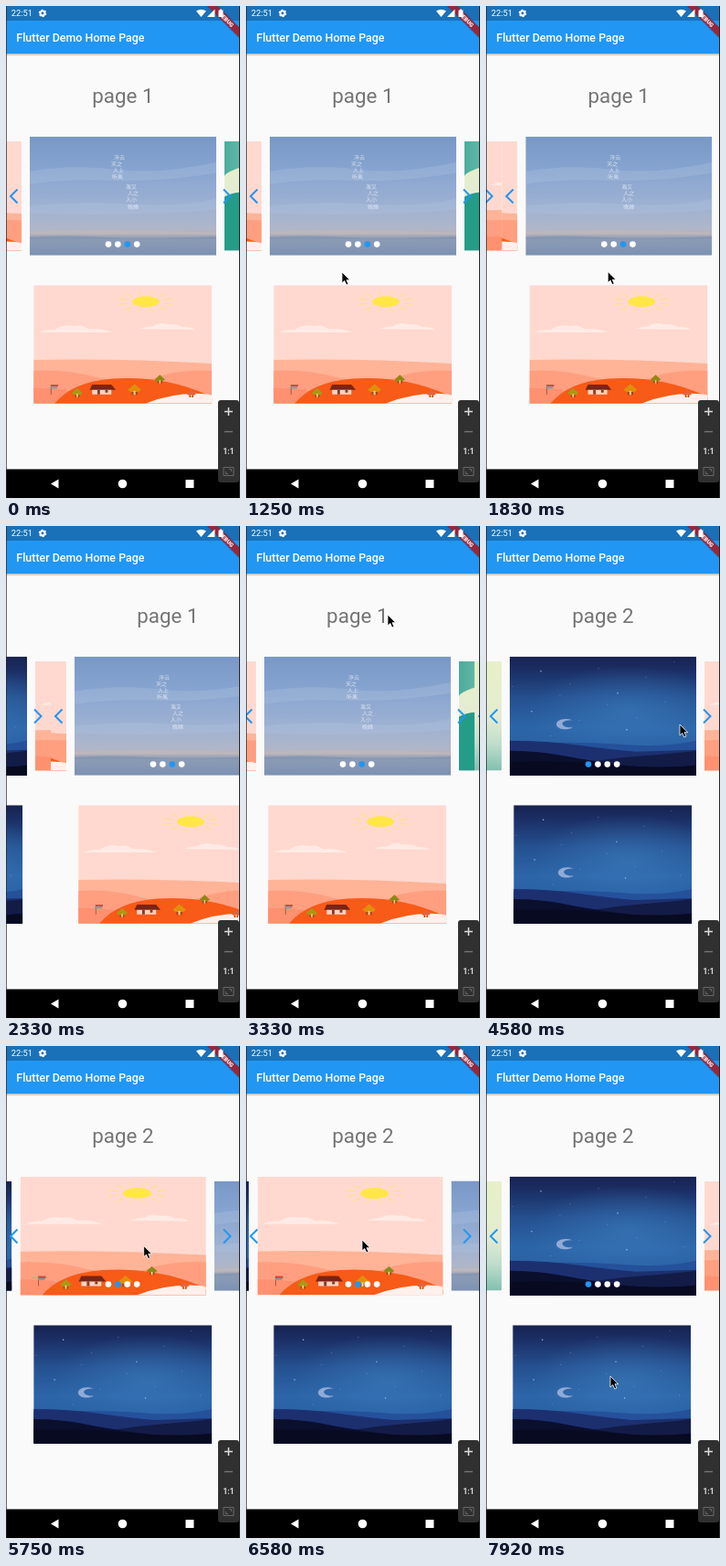
Recreate the animation shown at these times as an HTML page. Size 256 by 538 pixels, loop 8 s.

```html
<!DOCTYPE html>
<html lang="en">
<head>
<meta charset="utf-8">
<title>Nested page views</title>
<style>
html, body { margin: 0; width: 100%; height: 100%; overflow: hidden; background: #fafafa; }
svg { display: block; }
#stage { width: 100vw; height: 100vh; }
text { font-family: Roboto, sans-serif; }
.poem { font: 6px "Noto Sans CJK SC", "Noto Sans CJK", sans-serif; fill: #eef2fa; opacity: .8; }
</style>
</head>
<body>
<svg id="stage" viewBox="0 0 256 538" xmlns="http://www.w3.org/2000/svg">
<defs>
  <linearGradient id="nightSky" x2="0" y2="1">
    <stop offset="0" stop-color="#17224f"/><stop offset=".12" stop-color="#1b2f66"/>
    <stop offset=".35" stop-color="#25508f"/><stop offset=".6" stop-color="#2c66a9"/>
    <stop offset="1" stop-color="#27599c"/>
  </linearGradient>
  <radialGradient id="nightGlow">
    <stop offset="0" stop-color="#3a7abb" stop-opacity=".65"/>
    <stop offset="1" stop-color="#3a7abb" stop-opacity="0"/>
  </radialGradient>
  <linearGradient id="duskSky" x2="0" y2="1">
    <stop offset="0" stop-color="#7898c6"/><stop offset=".3" stop-color="#88a5d0"/>
    <stop offset=".6" stop-color="#9fb2d2"/><stop offset=".78" stop-color="#b0b6c8"/>
    <stop offset=".82" stop-color="#b3b1bb"/><stop offset=".86" stop-color="#8c9cb6"/>
    <stop offset="1" stop-color="#7c91b1"/>
  </linearGradient>
  <linearGradient id="greenSky" x2="0" y2="1">
    <stop offset="0" stop-color="#e6f1c8"/><stop offset=".5" stop-color="#e4ecd2"/>
    <stop offset=".75" stop-color="#c0dfcc"/><stop offset="1" stop-color="#82bfb0"/>
  </linearGradient>
  <linearGradient id="teal">
    <stop offset="0" stop-color="#4aac9d"/><stop offset="1" stop-color="#4aac9d" stop-opacity="0"/>
  </linearGradient>
  <linearGradient id="sea">
    <stop offset="0" stop-color="#239c88"/><stop offset=".4" stop-color="#239c88"/>
    <stop offset="1" stop-color="#239c88" stop-opacity="0"/>
  </linearGradient>
  <linearGradient id="barShadow" x2="0" y2="1">
    <stop offset="0" stop-opacity=".28"/><stop offset="1" stop-opacity="0"/>
  </linearGradient>

  <symbol id="night" viewBox="0 0 204 130" preserveAspectRatio="none">
    <path fill="url(#nightSky)" d="M0 0h204v130H0z"/>
    <ellipse cx="130" cy="62" rx="110" ry="52" fill="url(#nightGlow)"/>
    <g id="stars" fill="#a9c8ee"/>
    <path fill="#8fabd6" d="M69 69.500C58 66 50 70 51 75C53 80 63 81 69 77.500C62 78 57.500 76 57.500 73.500C57.500 71 62 69.500 69 69.500z"/>
    <path fill="#24519a" d="M0 96Q70 92 120 96T204 92V130H0z"/>
    <path fill="#1c3070" d="M0 92Q40 92 76 97T138 104Q170 103 204 102V130H0z"/>
    <path fill="#131c47" d="M45 124Q90 113 140 109T204 103V130H45z"/>
    <path fill="#0b0f2e" d="M0 103Q32 103 62 109T150 122L204 124V130H0z"/>
    <path fill="#070a20" d="M0 115Q60 113 110 118T204 119V130H0z"/>
  </symbol>

  <symbol id="peach" viewBox="0 0 204 130" preserveAspectRatio="none">
    <path fill="#ffd9cf" d="M0 0h204v130H0z"/>
    <g id="rays" stroke="#ffe277" stroke-width="1"/>
    <ellipse cx="128.5" cy="18" rx="15.5" ry="6" fill="#ffe746"/>
    <path fill="#ffebe5" d="M6 52Q14 48 24 49Q34 42 47 45Q56 43 62 48Q78 47 90 52zM121 48Q128 45 136 45Q144 40 154 43Q164 42 170 46Q180 45 185 49z"/>
    <path fill="#ffb397" d="M0 82Q90 80 204 86V130H0z"/>
    <path fill="#ff9f80" d="M0 94Q38 92 76 102T150 98Q180 92 204 94V130H0z"/>
    <path fill="#ff9170" d="M0 113Q30 112 58 119L70 130H0z"/>
    <path fill="#f85a17" d="M24 130Q44 106 90 102.500Q150 99 198 120L204 124V130z"/>
    <path fill="#fff0ec" d="M128 130Q156 119 186 119Q197 119 204 121V130z"/>
    <path stroke="#865044" stroke-width=".8" d="M20 109v11"/>
    <path fill="#d94747" d="M20 109h8v2.500h-8z"/><path fill="#6aa8a0" d="M19 111.500h8v2h-8z"/>
    <path fill="#ffd4c3" d="M67 114h22v6H67z"/>
    <path fill="#7a2413" d="M67 109h22l5 6H64z"/>
    <path fill="#8b3a25" d="M73 115h3v5h-3zM82 115h3v3h-3z"/>
    <g id="huts"/>
  </symbol>

  <symbol id="dusk" viewBox="0 0 204 130" preserveAspectRatio="none">
    <path fill="url(#duskSky)" d="M0 0h204v130H0z"/>
    <path fill="#b0c2de" opacity=".3" d="M0 38Q50 30 96 36T204 28V40Q140 50 90 48T0 52zM0 76Q60 70 110 74T204 68V80Q110 88 0 84z"/>
    <path fill="#c8bab9" opacity=".45" d="M0 104Q100 101 204 105V107H0z"/>
    <path fill="#6f87a8" opacity=".4" d="M0 110Q40 107 80 110T204 109V112H0z"/>
    <g class="poem" text-anchor="middle">
      <text x="98" y="25">浮云</text><text x="95" y="32">天之</text><text x="97" y="39">人上</text><text x="96" y="46">听風</text>
      <text x="111" y="57">海又</text><text x="113" y="64">人之</text><text x="111" y="71">入小</text><text x="113" y="79">晚歸</text>
    </g>
  </symbol>

  <symbol id="green" viewBox="0 0 204 130" preserveAspectRatio="none">
    <path fill="url(#greenSky)" d="M0 0h204v130H0z"/>
    <path fill="url(#teal)" d="M0 0H120Q60 20 30 28T0 42z"/>
    <path fill="url(#sea)" d="M0 66Q14 58 34 62T90 84T150 130H0z"/>
  </symbol>
</defs>

<path fill="#fafafa" d="M0 0h256v538H0z"/>
<g id="pages"></g>

<path fill="#2196f3" d="M0 0h256v52H0z"/>
<path fill="url(#barShadow)" d="M0 52h256v3H0z"/>
<path fill="#1a71b7" d="M0 0h256v16H0z"/>
<text x="11.300" y="38.600" font-size="12.460" font-weight="500" fill="#fff">Flutter Demo Home Page</text>
<g transform="translate(256 0) rotate(45)">
  <path fill="#000" opacity=".15" d="M-36 16.500h72v9.500h-72z"/>
  <path fill="#98263c" d="M-36 17.400h72v7.500h-72z"/>
  <text y="23.300" font-size="6.200" font-weight="900" fill="#fff" text-anchor="middle">DEBUG</text>
</g>
<g fill="#fff">
  <text x="5.800" y="11.300" font-size="9.300">22:51</text>
  <circle cx="40" cy="8" r="2.400" fill="none" stroke="#fff" stroke-width="2"/>
  <circle cx="40" cy="8" r="3.700" fill="none" stroke="#fff" stroke-width="1.200" stroke-dasharray="1.940"/>
  <path d="M208 5.500Q213.500 1.800 219 5.500L213.500 12z"/>
  <path d="M228.500 3.500v8.500h-8.500z"/>
  <path d="M232.500 4.500h1.500v-1h2v1h1.500v7.500h-5z"/>
</g>

<path d="M0 506.500h256v31.500H0z"/>
<path fill="#fff" d="M49 522.500l8.500-5v10zM196.500 518h9v9h-9z"/>
<circle cx="127.500" cy="522.500" r="4.800" fill="#fff"/>
<path fill="#262626" d="M0 0h.7v538H0zM255 0h1v538h-1z"/>
<rect x="232" y="431" width="23" height="90" rx="3" fill="#303030"/>
<path stroke="#ddd" stroke-width="1.500" d="M239 443.500h9M243.500 439v9"/>
<path stroke="#777" stroke-width="1.300" d="M239 465.500h9"/>
<text x="243.500" y="490" font-size="8.500" font-weight="700" fill="#ddd" text-anchor="middle">1:1</text>
<path fill="none" stroke="#666" d="M238 504.500h11v9h-11zM240.500 509v2.500h2.500M246.500 509v-2.500h-2.500"/>

<path id="cursor" d="M0 0V12L2.800 9.500L4.800 14L7 13L5 8.700H8.800z" stroke="#fff" stroke-width=".8"/>
</svg>

<script>
const $ = id => document.getElementById(id);
const LOOP = 8000, STEP = 1000 / 12, WIDTH = 256, PITCH = 204.8;
const PICTURES = ['night', 'peach', 'dusk', 'green'];
const BLUE = '#2196f3';

// Small scenery details
const hut = (x, y, s, roof) =>
  `<g transform="translate(${x} ${y}) scale(${s})"><path fill="#a8441c" d="M-3 0h6v5h-6z"/>
   <path fill="${roof}" d="M0-6L7 0L4 2H-4L-7 0z"/><path fill="#ffd27a" d="M-1 1h2v4h-2z"/></g>`;
$('huts').innerHTML = hut(50, 118.5, .9, '#a79a16') + hut(115.5, 115, 1.1, '#e08f0d') +
  hut(144.5, 103.5, .85, '#8a8a16') + hut(180.5, 119.5, .75, '#e8623c');
$('rays').innerHTML = Array.from({ length: 12 }, (_, i) => {
  const a = (i + .5) * Math.PI / 6, x = Math.cos(a), y = Math.sin(a);
  return `<path d="M${128.5 + 22 * x} ${18 + 8 * y}L${128.5 + 32 * x} ${18 + 12 * y}"/>`;
}).join('');
$('stars').innerHTML = Array.from({ length: 16 }, (_, i) =>
  `<circle cx="${(i * 73 + 31) % 198 + 3}" cy="${(i * 37 + 12) % 84 + 4}" r="${i % 4 ? .4 : .7}"/>`).join('');

// One outer page: title, looping carousel, dots, arrows and lower picture
function makePage(number, lower) {
  const page = document.createElementNS('http://www.w3.org/2000/svg', 'svg');
  page.setAttribute('width', WIDTH);
  page.setAttribute('height', 538);
  page.innerHTML = `
    <text x="127.800" y="105.700" font-size="22.400" fill="#757575" text-anchor="middle">page ${number}</text>
    ${PICTURES.map(p => `<use class="item" href="#${p}" width="204" height="130"/>`).join('')}
    ${PICTURES.map((_, i) => `<circle class="dot" cx="${112 + 10.4 * i}" cy="260.600" r="3.300"/>`).join('')}
    <path fill="none" stroke="${BLUE}" stroke-width="2" d="M12.500 200.500L5 208L12.500 215.500M238 200.500L245.500 208L238 215.500"/>
    <use class="lower" href="#${lower}" y="305.300" width="195" height="129.500"/>`;
  $('pages').append(page);
  const items = page.querySelectorAll('.item'), dots = page.querySelectorAll('.dot');
  const picture = page.querySelector('.lower');
  return (x, position, lowerShift = 0) => {
    page.setAttribute('x', x);
    items.forEach((item, i) => {
      const away = ((i - position + 2) % 4 + 4) % 4 - 2;
      const scale = 1 - .08 * Math.min(1, Math.abs(away));
      const left = 128 + away * PITCH - 102 * scale, top = 207.7 - 65 * scale;
      item.setAttribute('transform', `translate(${left} ${top}) scale(${scale})`);
    });
    const active = (Math.round(position) % 4 + 4) % 4;
    dots.forEach((dot, i) => dot.setAttribute('fill', i === active ? BLUE : '#fff'));
    picture.setAttribute('x', 30.2 + lowerShift);
  };
}
const pages = [makePage(0, 'night'), makePage(1, 'peach'), makePage(2, 'night')];

// Tracks: [time in ms, value...]
const OUTER = [[1500, 0], [2333, 49], [2500, 62], [3000, 0], [3250, 0], [3333, -6], [4083, -256]];
const CAROUSEL = [[4830, 0], [5500, 1], [5670, 1], [6250, 2], [6333, 2], [6583, 1.068], [6750, 1], [7420, 0]];
const LOWER = [[7833, 0], [7917, -1], [8000, -3]];
const CURSOR = [[917, 200, 235], [1250, 105, 291], [1500, 105, 291], [2300, 180, 290],
  [2583, 205, 130], [3000, 205, 100], [3333, 155, 97], [3667, 70, 97], [4000, 90, 110],
  [4583, 212, 217], [4830, 212, 217], [5250, 75, 222], [5583, 195, 220], [6000, 70, 216],
  [6333, 75, 214], [6583, 127, 212], [6750, 75, 212], [7167, 180, 214], [7417, 170, 240],
  [7833, 137, 361], [7917, 136, 361], [8000, 133, 361]];

function at(track, t) {
  const next = track.findIndex(key => key[0] > t);
  if (next === 0) return track[0].slice(1);
  if (next < 0) return track[track.length - 1].slice(1);
  const a = track[next - 1], b = track[next];
  const u = (t - a[0]) / (b[0] - a[0]), eased = u * u * (3 - 2 * u);
  return a.slice(1).map((v, i) => v + (b[i + 1] - v) * eased);
}

function draw(now) {
  const t = Math.floor((now % LOOP + 4) / STEP) * STEP + .5;
  const [shift] = at(OUTER, t);
  pages[0](shift - WIDTH, 0);
  pages[1](shift, 2);
  pages[2](shift + WIDTH, at(CAROUSEL, t)[0], at(LOWER, t)[0]);
  const [x, y] = at(CURSOR, t);
  const hidden = t < 917 || (t > 2300 && t < 2583);
  $('cursor').setAttribute('transform', `translate(${x} ${y})`);
  $('cursor').setAttribute('visibility', hidden ? 'hidden' : 'visible');
}

const start = performance.now();
function tick() {
  draw(performance.now() - start);
  requestAnimationFrame(tick);
}
tick();
</script>
</body>
</html>
```
